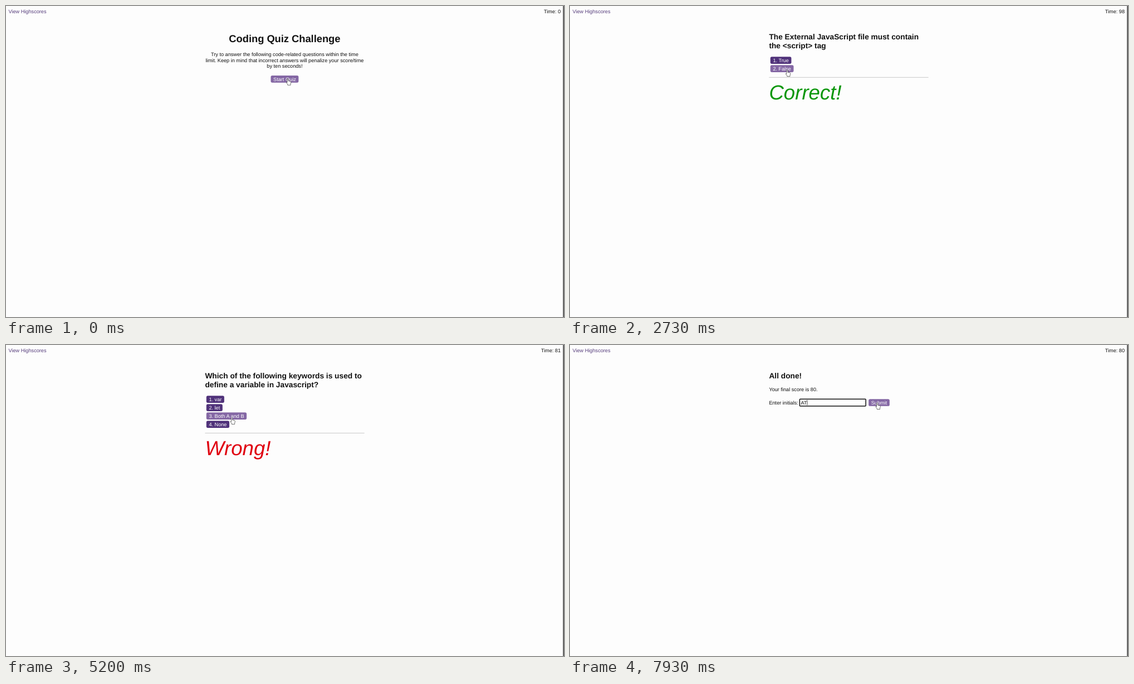
An HTML page for the animation above (8000 ms loop, 1002x559 px).

```html
<!DOCTYPE html>
<html lang="en">
<head>
<meta charset="utf-8">
<title>Coding Quiz Challenge</title>
<style>
  html, body { margin: 0; width: 100%; height: 100%; overflow: hidden; background: #fdfdfd; }
  svg { display: block; }
  text { font: 9.16px "Liberation Sans", Arial, sans-serif; fill: #111; white-space: pre; text-rendering: geometricPrecision; }
  .h1 { font-size: 18.3px; font-weight: bold; }
  .h2 { font-size: 13.74px; font-weight: bold; }
  .mid { text-anchor: middle; }
  .end { text-anchor: end; }
  .link { fill: #563d7c; }
  .label { fill: #fff; }
  .verdict { font-size: 36.64px; font-style: italic; }
  .button { fill: #50327a; }
  .button.hover { fill: #8467a4; }
  .pointer { fill: #fff; stroke: #333; stroke-width: .7; stroke-linejoin: round; }
</style>
</head>
<body>
<svg id="stage" width="1002" height="559" viewBox="0 0 1002 559"></svg>
<script>
const LOOP = 8000, LEFT = 357.4, CENTER = 500.4, PAD = 4.58, BUTTON_H = 12.6;
const stage = document.getElementById("stage");

function add(parent, tag, attrs, content = "") {
  const el = document.createElementNS("http://www.w3.org/2000/svg", tag);
  for (const key in attrs) el.setAttribute(key, attrs[key]);
  el.textContent = content;
  return parent.appendChild(el);
}
const write = (parent, content, x, y, cls = "") => add(parent, "text", { x, y, class: cls }, content);
const show = (el, on) => { el.style.display = on ? "" : "none"; };
const set = (el, attrs) => { for (const key in attrs) el.setAttribute(key, attrs[key]); };

const screens = [];
function screen(start, feedbackY) {
  const s = { start, feedbackY, g: add(stage, "g", {}), buttons: [] };
  screens.push(s);
  return s;
}

function button(s, label, x, y, centered) {
  const rect = add(s.g, "rect", { y, height: BUTTON_H, rx: 2.6, class: "button" });
  const text = write(s.g, label, 0, y + 9.6, "label");
  const width = text.getComputedTextLength() + 2 * PAD;
  if (centered) x -= width / 2;
  set(rect, { x, width });
  set(text, { x: x + PAD });
  s.buttons.push({ rect, x, y, width });
}

function question(start, lines, answers) {
  const s = screen(start, 98 + 15 * answers.length);
  lines.forEach((line, i) => write(s.g, line, LEFT, 60.2 + 16 * i, "h2"));
  answers.forEach((a, i) => button(s, `${i + 1}. ${a}`, 359.8, 91.3 + 15 * i));
}

write(stage, "View Highscores", 4.5, 13.1, "link");
const timer = write(stage, "", 996, 13.1, "end");
add(stage, "rect", { x: 1000.4, y: 0, width: 1.2, height: 559, fill: "#000" });

const intro = screen(0, 0);
write(intro.g, "Coding Quiz Challenge", CENTER, 64.5, "h1 mid");
["Try to answer the following code-related questions within the time",
 "limit. Keep in mind that incorrect answers will penalize your score/time",
 "by ten seconds!"].forEach((line, i) => write(intro.g, line, CENTER, 90 + 10.65 * i, "mid"));
button(intro, "Start Quiz", CENTER, 125.1, true);

question(260, ["Inside which HTML element do we put the", "Javascript?"],
  ["js tag", "javascript tag", "script tag", "scrpting tag"]);
question(1860, ["The External JavaScript file must contain", "the <script> tag"], ["True", "False"]);
question(3200, ["JavaScript is a ___ -side programming", "language."], ["Client", "Server", "Both", "None"]);
question(4660, ["Which of the following keywords is used to", "define a variable in Javascript?"],
  ["var", "let", "Both A and B", "None"]);

const done = screen(6060, 122.4);
write(done.g, "All done!", LEFT, 60.2, "h2");
write(done.g, "Your final score is 80.", LEFT, 83.4);
write(done.g, "Enter initials:", LEFT, 106.7);
const field = add(done.g, "rect", { x: 412.4, y: 97.2, width: 118.8, height: 12.6, rx: 1, fill: "#fff" });
const typed = write(done.g, "", 414.4, 106.7);
const caret = add(done.g, "rect", { y: 98.8, width: .8, height: 9.4, fill: "#111" });
button(done, "Submit", 536.2, 97.2);

const feedback = add(stage, "g", {});
add(feedback, "rect", { x: LEFT, y: -.5, width: 286.2, height: 1.1, fill: "#ccc" });
const verdict = write(feedback, "", LEFT, 40.1, "verdict");
const verdicts = [[1860, true], [3200, true], [4660, false], [6060, true]];

const ring = add(stage, "circle", { fill: "none", stroke: "#cf2f62", "stroke-opacity": .65, "stroke-width": 1 });
const hand = add(stage, "path", { class: "pointer",
  d: "M-1 .8Q0-.6 1 .8V4.4L4.6 5.2Q6 5.6 5.8 7L5 10.2V12H-.2V10.8L-2.6 7.4Q-2.8 6.2-1 7.2Z" });
const arrow = add(stage, "path", { class: "pointer", d: "M0 0V10L2.3 7.9L3.8 11.2L5.3 10.5L3.8 7.3H6.9Z" });

// time, x, y of the pointer tip
const path = [
  [0, 506, 130.2], [400, 506, 130.2], [1500, 403.3, 127.6], [1930, 403.3, 127.6],
  [2600, 390, 114.6], [3500, 390, 114.6], [3900, 392.5, 111.6], [4730, 392.5, 111.6],
  [5180, 405.6, 130.4], [6070, 405.6, 130.4], [6200, 440, 104], [7790, 440, 104],
  [7920, 551.5, 103.6], [LOOP, 551.5, 103.6]
];
const clicks = [260, 1860, 3200, 4660, 6060, 6460];

function pointerAt(t) {
  const i = path.findIndex(p => p[0] > t);
  const [t0, x0, y0] = path[i - 1], [t1, x1, y1] = path[i];
  const k = (t - t0) / (t1 - t0), e = k * k * (3 - 2 * k);
  return [x0 + (x1 - x0) * e, y0 + (y1 - y0) * e];
}

function secondsAt(t) {
  if (t < 260) return 0;
  return 100 - Math.min(5, Math.floor((t - 260) / 1000)) - (t >= 4660 ? 15 : 0);
}

function drawField(t) {
  const focused = t >= 6400;
  set(field, { stroke: focused ? "#111" : "#767676", "stroke-width": focused ? 1.5 : .9 });
  const value = t < 7130 ? "" : t < 7460 ? "A" : "AT";
  typed.textContent = value;
  const since = t - (t < 7130 ? 6400 : t < 7460 ? 7130 : 7460);
  show(caret, focused && since % 1000 < 500);
  set(caret, { x: 414.4 + (value ? typed.getComputedTextLength() : 0) });
}

function draw(t) {
  const current = screens.filter(s => s.start <= t).pop();
  screens.forEach(s => show(s.g, s === current));
  timer.textContent = "Time: " + secondsAt(t);

  const [x, y] = pointerAt(t);
  let over = false;
  for (const b of current.buttons) {
    const hit = x >= b.x && x <= b.x + b.width && y >= b.y && y <= b.y + BUTTON_H;
    b.rect.classList.toggle("hover", hit);
    over = over || hit;
  }
  const inField = current === done && x > 412 && x < 532 && y > 97 && y < 110;
  show(hand, over);
  show(arrow, !over && !inField);
  for (const el of [hand, arrow]) set(el, { transform: `translate(${x} ${y})` });

  const click = clicks.find(c => t >= c - 130 && t < c);
  show(ring, click !== undefined);
  if (click !== undefined) set(ring, { cx: x, cy: y, r: 8 + (t - click + 130) * .1 });

  const answer = verdicts.find(([at]) => t >= at && t < at + 1000);
  show(feedback, answer);
  if (answer) {
    set(feedback, { transform: `translate(0 ${current.feedbackY + .3})` });
    verdict.textContent = answer[1] ? "Correct!" : "Wrong!";
    verdict.style.fill = answer[1] ? "#0a960a" : "#e0000f";
  }
  if (current === done) drawField(t);
}

function frame() {
  draw(performance.now() % LOOP);
  requestAnimationFrame(frame);
}
frame();
</script>
</body>
</html>
```
